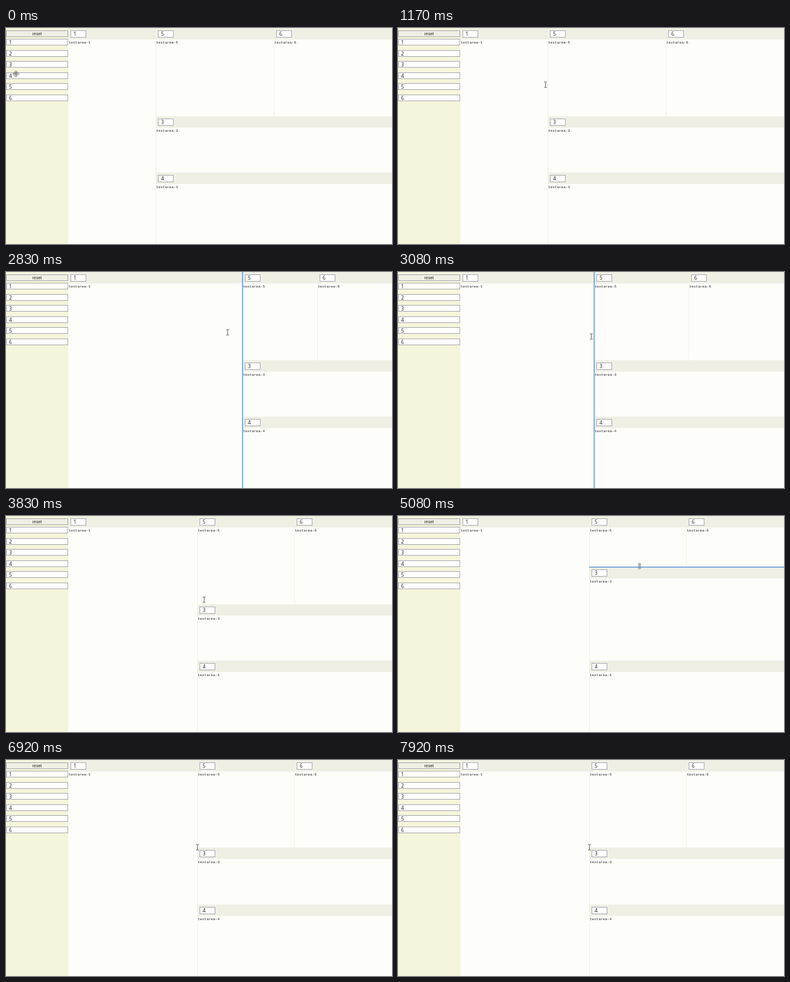
Recreate the animation shown at these times as an HTML page with a canvas. Size 640x360 px, loop 8000 ms.

```html
<!DOCTYPE html>
<html lang="en">
<head>
<meta charset="utf-8">
<title>Resizable panes</title>
<style>
html, body { margin: 0; width: 100%; height: 100%; overflow: hidden; background: #fdfdfa; }
canvas { display: block; }
</style>
</head>
<body>
<canvas id="stage" width="640" height="360"></canvas>
<script>
const ctx = document.getElementById('stage').getContext('2d');
const LOOP = 8000, FPS = 12;
const BAR = '#efefe4', SIDE = '#f5f5dc', PAPER = '#fdfdfa', EDGE = '#f2f2e2';
const BORDER = '#a6a6ac', LINE = '#5f93d8', INK = '#222', POINTER = '#666';

const smooth = p => p * p * (3 - 2 * p);
const easeOut = p => 1 - (1 - p) ** 3;

// Each leg is [from, to, ...point]: seconds, then where that move ends.
function glide(t, start, legs, ease) {
  return legs.reduce((at, [from, to, ...end]) => {
    const p = ease(Math.min(1, Math.max(0, (t - from) / (to - from))));
    return at.map((v, i) => v + (end[i] - v) * p);
  }, start);
}

const splitX = t => glide(t, [248], [[2.58, 2.83, 394], [2.83, 3.31, 317]], easeOut)[0];
const splitY = t => glide(t, [147], [[5.06, 5.08, 85], [5.2, 5.65, 146]], easeOut)[0];

const LEAD = 0.06; // the panes trail the dragging pointer
const between = (t, from, to) => t >= from && t < to;

function pointerAt(t) {
  const [x, y] = glide(t, [16, 76], [
    [0.8, 1.2, 249, 94],
    [1.45, 1.67, 279, 96],
    [1.7, 2.1, 249, 94],
    [2.5, 3.3, 317, 110],
    [3.3, 3.8, 328, 139],
    [3.85, 4.3, 400, 146],
    [5.2, 5.65, 313, 141],
    [5.85, 6.1, 338, 134],
    [6.1, 6.6, 317, 145]
  ], smooth);
  return [
    between(t, 2.5, 3.3) ? splitX(t + LEAD) : x,
    between(t, 4.85, 5.6) ? splitY(t + LEAD) - 2 : y
  ];
}

function rect(x, y, w, h, color) {
  ctx.fillStyle = color;
  ctx.fillRect(x, y, w, h);
}

function box(x, y, w, h, fill = '#fff') {
  rect(x, y, w, h, fill);
  ctx.strokeStyle = BORDER;
  ctx.lineWidth = 1;
  ctx.strokeRect(x + 0.5, y + 0.5, w - 1, h - 1);
}

function text(label, x, y, font, align = 'left') {
  ctx.font = font;
  ctx.textAlign = align;
  ctx.fillStyle = INK;
  ctx.fillText(label, x, y);
}

const digit = (n, x, y) => text(n, x, y, '8.5px "Open Sans", sans-serif');

function pane(n, x, y, right, bottom) {
  rect(x, y, right - x, bottom - y, PAPER);
  rect(x, y, right - x, 19, BAR);
  if (n !== 1) rect(x, y, 1, bottom - y, EDGE);
  box(Math.round(x + 3.6), y + 4, 26, 12);
  digit(n, Math.round(x + 8.6), y + 13);
  text('textarea-' + n, Math.round(x + 0.6), y + 25.5, '6px "Liberation Mono", monospace');
}

function sidebar() {
  rect(0, 0, 103, 360, SIDE);
  box(0, 4, 103, 11, BAR);
  text('reset', 51.5, 12, '7px "Liberation Sans", sans-serif', 'center');
  for (let i = 0; i < 6; i++) {
    const y = Math.floor(18.4 + i * 18.6);
    box(0, y, 103, 11);
    digit(i + 1, 5, y + 9);
  }
}

function doubleArrow(angle) {
  ctx.save();
  ctx.rotate(angle);
  ctx.beginPath();
  for (const side of [-1, 1]) {
    ctx.moveTo(side * 3, -2.5);
    ctx.lineTo(side * 5.5, 0);
    ctx.lineTo(side * 3, 2.5);
    ctx.moveTo(0, side);
    ctx.lineTo(-4, side);
    ctx.lineTo(4, side);
  }
  ctx.strokeStyle = POINTER;
  ctx.lineWidth = 0.8;
  ctx.stroke();
  ctx.restore();
}

function iBeam() {
  rect(-0.5, -4, 1, 8, POINTER);
  for (const y of [-5, 4]) rect(-2.5, y, 5, 1, POINTER);
}

function drawPointer(t) {
  const [x, y] = pointerAt(t);
  const moving = t < 0.8;
  const column = moving || between(t, 2.05, 2.6);
  const row = moving || between(t, 4.3, 5.4);
  ctx.save();
  ctx.translate(Math.round(x) + 0.5, Math.round(y) + 0.5);
  if (column) doubleArrow(0);
  if (row) doubleArrow(Math.PI / 2);
  if (!column && !row) iBeam();
  ctx.restore();
}

function draw(t) {
  const x = Math.round(splitX(t)), y = Math.round(splitY(t));
  const middle = Math.floor((x + 640) / 2);

  sidebar();
  pane(1, 103, 0, x, 360);
  pane(5, x, 0, middle, y);
  pane(6, middle, 0, 640, y);
  pane(3, x, y, 640, 241);
  pane(4, x, 241, 640, 360);
  if (between(t, 2.05, 3.55)) rect(x - 0.5, 0, 1.5, 360, LINE);
  if (between(t, 4.4, 5.5)) rect(x, y - 0.5, 640 - x, 1.5, LINE);
  drawPointer(t);
}

const start = performance.now();
function loop() {
  const elapsed = (performance.now() - start) % LOOP;
  let tick = Math.floor((elapsed + 4) * FPS / 1000) % (LOOP * FPS / 1000);
  if (tick % 6 === 3) tick--; // every sixth picture is held
  draw(tick / FPS);
  requestAnimationFrame(loop);
}
loop();
</script>
</body>
</html>
```
